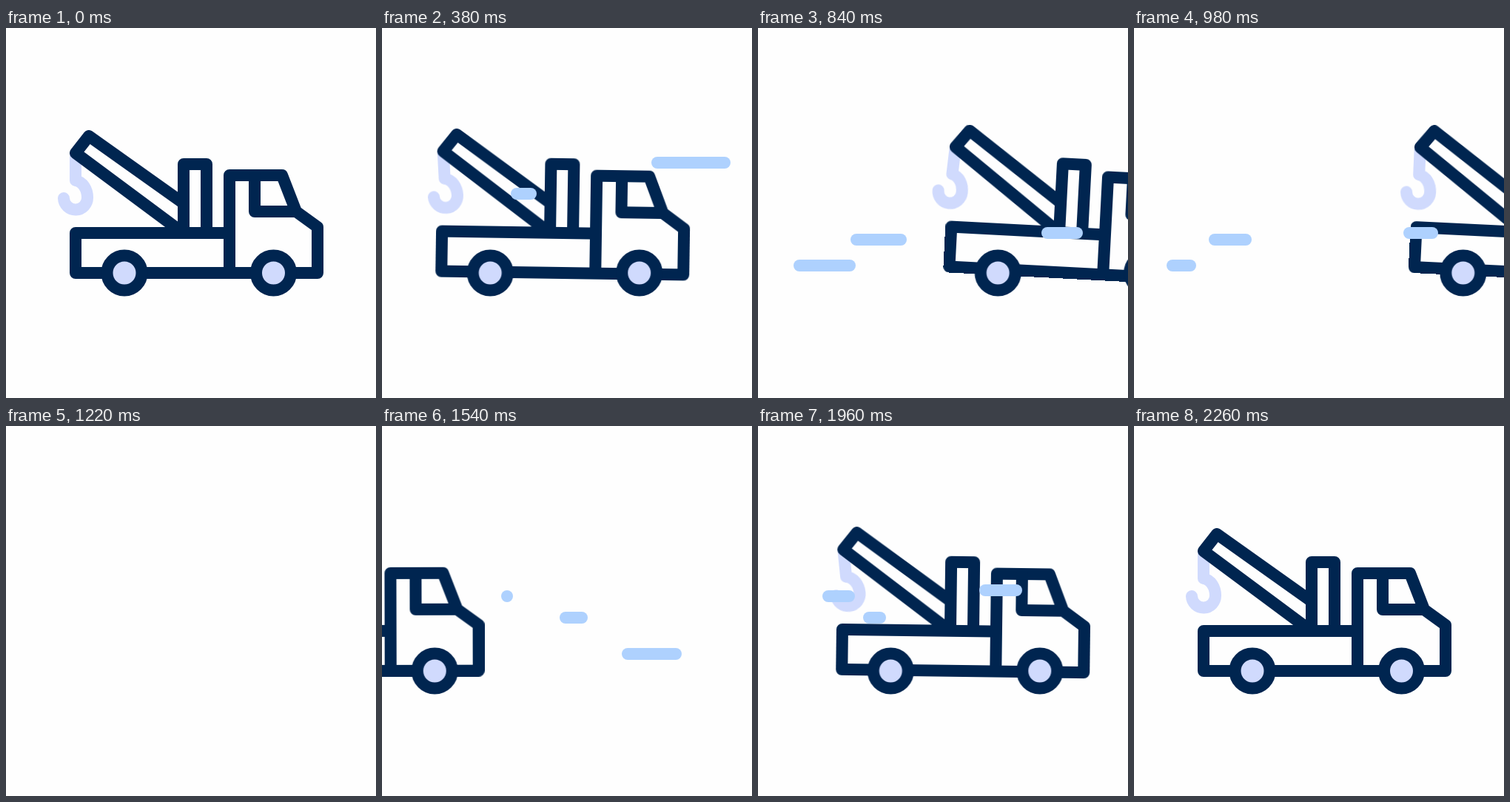
Recreate the animation shown at these times as an HTML page. Size 500 by 500 pixels, loop 2.32 s.

```html
<!DOCTYPE html>
<html lang="en">
<head>
<meta charset="utf-8">
<title>Tow truck</title>
<style>
  :root {
    --loop: 2320ms;
    --smooth: cubic-bezier(.333, 0, .667, 1);
  }
  html, body { margin: 0; width: 100%; height: 100%; overflow: hidden; background: #fefefe; }
  svg { position: absolute; width: 500px; height: 500px; }
  path, circle { fill: none; stroke: #002550; stroke-width: 16; stroke-linecap: round; stroke-linejoin: round; }
  circle { fill: #d0dafd; }

  #truck, #body, #hook { animation: var(--loop) var(--smooth) infinite; }
  #truck { animation-name: drive; }
  #body { animation-name: tilt; transform-origin: 257px 331px; }
  #hook { animation-name: swing; transform-origin: 94px 169px; stroke: #d0dafd; }

  /* Back up, leave on the right, come in from the left, overshoot, settle. */
  @keyframes drive {
    0%, 7.76% { transform: none; }
    21.55% { transform: translateX(-20px); }
    55.25% { transform: translateX(435px); }
    55.26% { transform: translateX(-464px); }
    82.84% { transform: translateX(20px); }
    97.41%, 100% { transform: none; }
  }
  @keyframes tilt {
    0%, 7.76% { transform: rotate(0deg); }
    14.66% { transform: rotate(1deg); }
    25.43% { transform: rotate(-1.1deg); }
    37.93% { transform: rotate(3.2deg); }
    53.45% { transform: rotate(1deg); }
    71.55% { transform: rotate(-.4deg); }
    79.74% { transform: rotate(2.4deg); }
    89.22% { transform: rotate(-.9deg); }
    97.41%, 100% { transform: rotate(0deg); }
  }
  @keyframes swing {
    0%, 7.76% { transform: rotate(0deg); }
    13.36% { transform: rotate(-8deg); }
    27.16% { transform: rotate(24deg); }
    37.93% { transform: rotate(2.5deg); }
    53.45% { transform: rotate(-12deg); }
    70.69% { transform: rotate(10deg); }
    81.03% { transform: rotate(-16deg); }
    89.22% { transform: rotate(8deg); }
    97.41%, 100% { transform: rotate(0deg); }
  }

  /* A streak shoots left from --x over --len; its tail follows late. */
  i {
    position: absolute;
    top: calc(var(--y) * 1px - 8px);
    height: 16px;
    border-radius: 8px;
    background: #aed1fe;
    animation: var(--loop) var(--smooth) infinite;
    animation-name: head, tail, life;
    animation-delay: calc(var(--at) * 1ms - var(--loop));
  }
  #wind { position: absolute; width: 500px; height: 500px; }
  @keyframes head {
    0% { left: calc(var(--x) * 1px - 8px); }
    17.65%, 100% { left: calc((var(--x) - var(--len)) * 1px - 8px); }
  }
  @keyframes tail {
    0%, 5.04% { right: calc(492px - var(--x) * 1px); }
    28.02%, 100% { right: calc(492px - (var(--x) - var(--len)) * 1px); }
  }
  @keyframes life {
    0% { visibility: visible; }
    28.02%, 100% { visibility: hidden; }
  }
</style>
</head>
<body>
<svg viewBox="0 0 500 500">
  <g id="truck">
    <g id="body">
      <path id="hook" d="M94 172V206C104 208 110 218 110 229A16 16 0 0 1 78 230"/>
      <path d="M240 237L112 146L94 169L234 273"/>
      <path d="M240 277V184H271V277"/>
      <path d="M302 277H94V331H421V269L392 248L373 199H302V331"/>
      <path d="M336 199V248H392"/>
    </g>
    <circle cx="160" cy="331" r="23.5"/>
    <circle cx="361.5" cy="331" r="23.5"/>
  </g>
</svg>
<div id="wind">
  <i style="--y:182; --x:475; --len:225; --at:188"></i>
  <i style="--y:224; --x:204; --len:46; --at:185"></i>
  <i style="--y:321; --x:183; --len:131; --at:475"></i>
  <i style="--y:286; --x:219; --len:110; --at:555"></i>
  <i style="--y:277; --x:446; --len:74; --at:569"></i>
  <i style="--y:308; --x:425; --len:121; --at:1258"></i>
  <i style="--y:259; --x:270; --len:120; --at:1430"></i>
  <i style="--y:230; --x:169; --len:74; --at:1532"></i>
  <i style="--y:222; --x:383; --len:79; --at:1600"></i>
</div>
</body>
</html>
```
